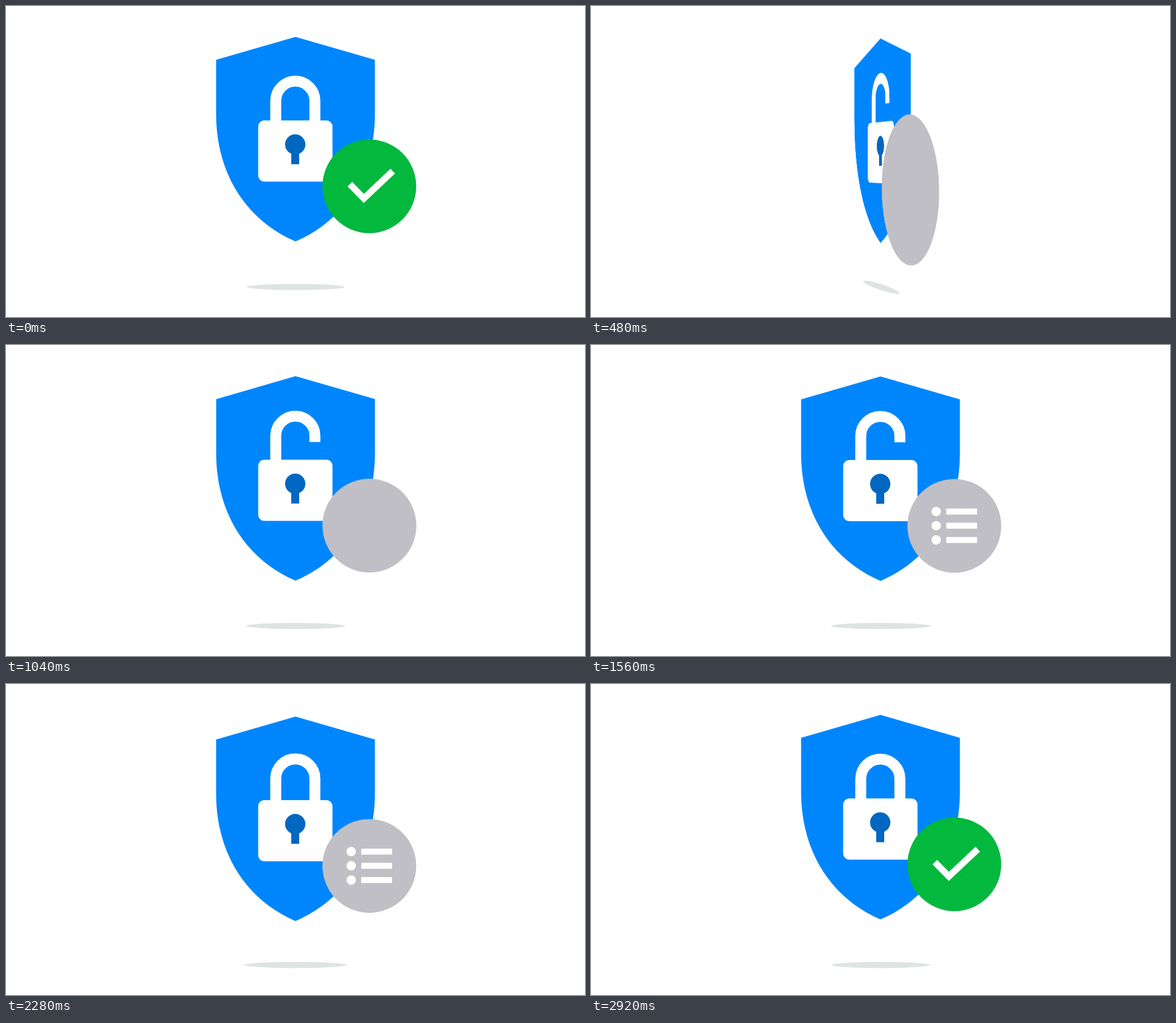
These frames come from a looping animation (1021x549 px, 2960 ms). An HTML page:

```html
<!DOCTYPE html>
<html lang="en">
<head>
<meta charset="utf-8">
<title>Shield</title>
<style>
  html, body { margin: 0; width: 100%; height: 100%; overflow: hidden; background: #fff; }
  #stage { position: absolute; left: 0; top: 0; width: 1021px; height: 549px; overflow: hidden;
           perspective: 1800px; perspective-origin: 510.5px 274.5px; }
  svg { display: block; transform-origin: 510.5px 274.5px; }
</style>
</head>
<body>
<div id="stage">
  <svg id="scene" width="1021" height="549" viewBox="0 0 1021 549">
    <ellipse id="shadow" cx="511" cy="496" ry="5.4" fill="#dde4e2"/>
    <g id="float">
      <path fill="#0086fc" d="M510.5 54.5L650.5 95V190C650.5 300 594 380 510.5 415.5C427 380 370.5 300 370.5 190V95Z"/>
      <path id="shackle" fill="none" stroke="#fff" stroke-width="19.3"/>
      <rect x="444.7" y="202" width="131" height="108" rx="11" fill="#fff"/>
      <g fill="#0167c0">
        <circle cx="510" cy="244.3" r="17.9"/>
        <rect x="503" y="255" width="14" height="24.3"/>
      </g>
      <g id="badge">
        <circle id="disc" cx="640.7" cy="318.3" r="82.7"/>
        <g id="list" fill="#fff"></g>
        <path id="check" d="M606.4 314.5L631 339.7L682 291.5" fill="none" stroke="#fff" stroke-width="11.6" pathLength="1" stroke-dasharray="1 2"/>
      </g>
    </g>
  </svg>
</div>
<script>
const LOOP = 2960, STEP = 40, SWAP = 450;
const GREEN = [2, 184, 61], GREY = [192, 191, 197];
const el = id => document.getElementById(id);
const lerp = (a, b, p) => a + (b - a) * p;

// Eased 0..1 progress between two times
function ease(t, from, to) {
  const p = Math.min(1, Math.max(0, (t - from) / (to - from)));
  return (1 - Math.cos(Math.PI * p)) / 2;
}

const rows = [293, 318, 343.2].map(y => {
  const row = document.createElementNS("http://www.w3.org/2000/svg", "g");
  row.innerHTML = `<circle cx="608.7" cy="${y}" r="8.3"/><rect x="626.5" y="${y - 5.3}" height="10.6"/>`;
  el("list").append(row);
  return { y, dot: row.firstChild, bar: row.lastChild };
});

// Turns edge-on, swaps the content, then swings back
function angleAt(t) {
  return t < SWAP ? 90 * (t / SWAP) ** 3.45 : 90 * Math.exp((SWAP - t) / 115);
}

function bobAt(t) {
  return 3.1 * (ease(t, 0, 600) - ease(t, 600, 1200) + ease(t, 1200, 2150) - ease(t, 2150, 2920));
}

function draw(t) {
  const swapped = t >= SWAP;
  const bob = bobAt(t);
  const angle = t < 1200 ? angleAt(t) : 0;
  el("scene").style.transform = `rotateY(${-angle}deg)`;
  el("float").setAttribute("transform", `translate(0 ${bob})`);
  el("shadow").setAttribute("rx", 86.6 + 1.4 * bob);

  const closed = swapped ? ease(t, 2000, 2520) : 1;
  const arcY = lerp(159.6, 167.2, closed);
  const legEnd = lerp(170.7, 230, closed);
  el("shackle").setAttribute("d", `M475.7 215V${arcY}A34.5 34.5 0 0 1 544.7 ${arcY}V${legEnd}`);

  const pop = 1 + 0.52 * (ease(t, 340, 500) - ease(t, 500, 670));
  el("badge").setAttribute("transform",
    `translate(640.7 318.3) scale(${pop}) translate(-640.7 -318.3)`);

  const green = swapped ? ease(t, 2440, 2640) : 1;
  el("disc").setAttribute("fill", `rgb(${GREY.map((v, i) => lerp(v, GREEN[i], green))})`);

  el("list").setAttribute("opacity", 1 - ease(t, 2440, 2560));
  rows.forEach(({ dot, bar }, i) => {
    const start = 1100 + i * 100;
    dot.setAttribute("r", 8.3 * ease(t, start, start + 120));
    bar.setAttribute("width", 54.2 * ease(t, start + 60, start + 240));
  });

  const drawn = swapped ? ease(t, 2560, 2800) : 1;
  el("check").setAttribute("stroke-dashoffset", 1 - drawn);
  el("check").setAttribute("visibility", drawn > 0 ? "visible" : "hidden");
}

const begin = performance.now();
function frame() {
  const t = (performance.now() - begin) % LOOP;
  draw(Math.floor(t / STEP) * STEP);
  requestAnimationFrame(frame);
}
frame();
</script>
</body>
</html>
```
